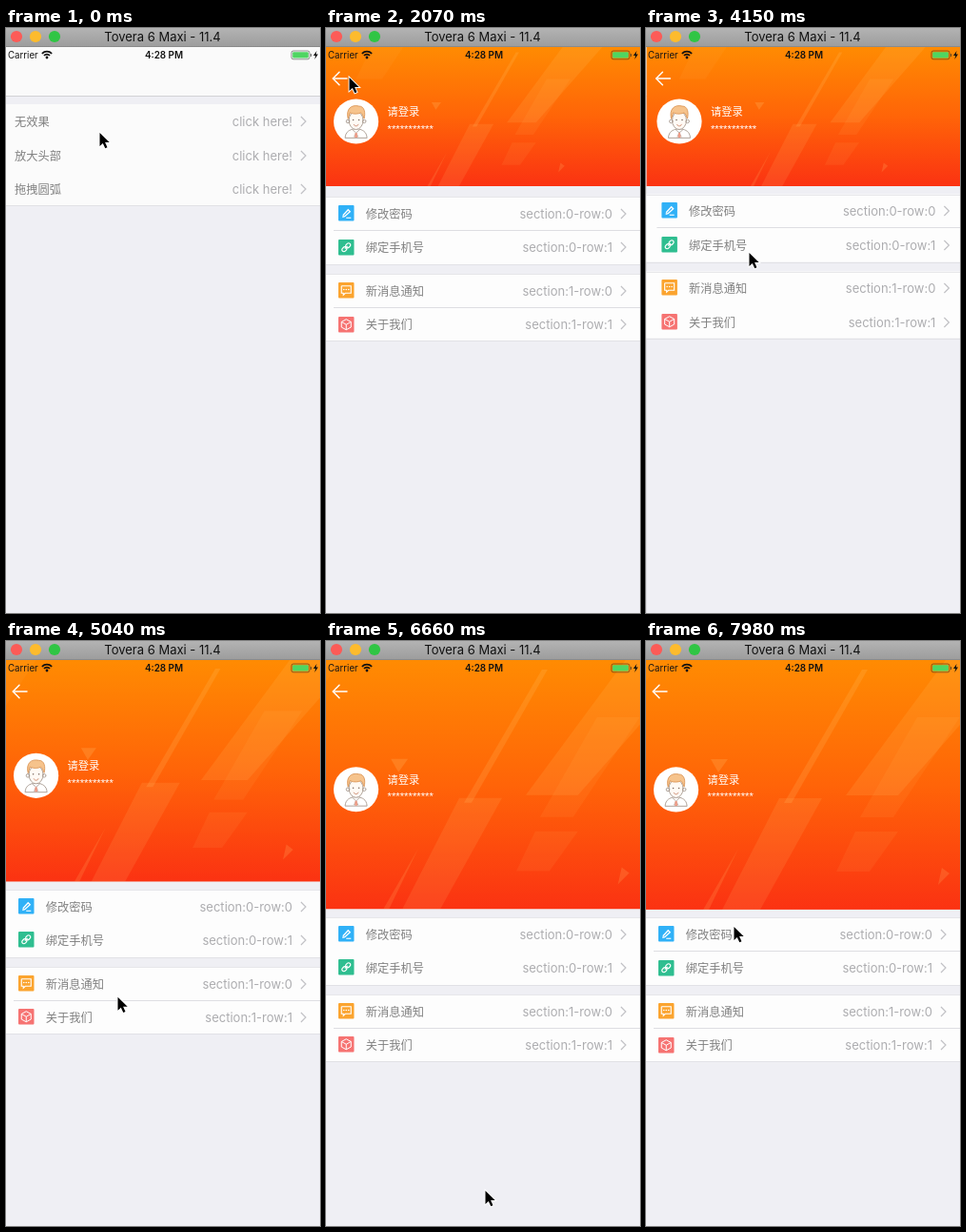
Recreate the animation shown at these times as an HTML page with a canvas. Size 330 px wide and 614 px high, loop 8000 ms.

```html
<!DOCTYPE html>
<html lang="zh">
<head>
<meta charset="utf-8">
<style>
html, body { margin: 0; width: 330px; height: 614px; overflow: hidden; background: #efeff4; }
canvas { display: block; width: 330px; height: 614px; }
</style>
</head>
<body>
<canvas id="stage"></canvas>
<script>
const W = 330, H = 614, LOOP = 8000, TICK = 147.75;
const canvas = document.getElementById('stage');
const c = canvas.getContext('2d');
const dpr = window.devicePixelRatio || 1;
canvas.width = W * dpr;
canvas.height = H * dpr;

const LATIN = 'Inter, Roboto, sans-serif';
const HAN = '"Noto Sans CJK SC", "Noto Sans CJK", sans-serif';
const BG = '#efeff4';

// Keys are in ticks: the screen was sampled at a steady slow rate.
const POINTER = [
  [0, 98, 109], [1, 98, 107], [3, 104, 160], [5, 110, 235], [7, 118, 300], [10, 128, 378],
  [12, 80, 210], [14, 24, 51], [17, 24, 51], [18, 11, 55], [21, 11, 55], [24, 96, 132],
  [25, 96, 132], [26, 98, 140], [28, 108, 235], [30, 108, 235], [31, 108, 180], [35, 120, 437],
  [39, 118, 290], [45, 167, 576], [46, 165, 574], [51, 96, 270], [54, 92, 299]
];
const PULL = [
  [5, 0], [10, 70], [11, 46], [12, 20], [13, 8], [14, 2.85], [16, 0],
  [31, 0], [35, 115.5], [39, 57.7], [42, 100], [45, 115.5], [46, 115.5], [50, 75], [54, 115.88]
];
// Highlights in the banner, measured from its top centre at a height of 262.
const SHINE = [
  [.12, 20, 145, -25, 145, -85, 262, -45, 262],
  [.16, 68, 10, 62, 10, -20, 150, -12, 150],
  [.13, 150, 0, 225, 0, 100, 142, 45, 142],
  [.08, 120, 60, 165, 60, 95, 165, 60, 165],
  [.08, 55, 180, 100, 180, 70, 222, 35, 222],
  [.2, -97, 104, -79, 104, -89, 118],
  [.15, -105, 262, -99, 262, -68, 198],
  [.06, -210, 0, -150, 0, -190, 60, -240, 60],
  [.18, 146, 218, 154, 224, 142, 236]
];
const ROWS = [
  ['修改密码', 'section:0-row:0', 192, '#30b1f7'],
  ['绑定手机号', 'section:0-row:1', 227.5, '#2fbe90'],
  ['新消息通知', 'section:1-row:0', 273, '#fba42f'],
  ['关于我们', 'section:1-row:1', 308.5, '#f67372']
];

function at(keys, t, i = 1) {
  if (t <= keys[0][0]) return keys[0][i];
  for (let k = 1; k < keys.length; k++) {
    const a = keys[k - 1], b = keys[k];
    if (t <= b[0]) return a[i] + (b[i] - a[i]) * (t - a[0]) / (b[0] - a[0]);
  }
  return keys[keys.length - 1][i];
}

// Critically damped spring, 1 falling to 0.
function spring(t) {
  const s = 2.51 * Math.max(0, t);
  return (1 + s) * Math.exp(-s);
}

function pageX(t) {
  const s = t < 19.825 ? spring(t - .6) : t < 25.3 ? 1 - spring(t - 19.825) : spring(t - 25.37);
  return s < .002 ? 0 : s > .998 ? W + 10 : s * W;
}

function rect(x, y, w, h, fill) {
  c.fillStyle = fill;
  c.fillRect(x, y, w, h);
}

function trace(pts, x = 0, y = 0, k = 1) {
  c.beginPath();
  for (let i = 0; i < pts.length; i += 2) c.lineTo(x + pts[i] * k, y + pts[i + 1] * k);
}

function line(pts, color, width, x, y) {
  trace(pts, x, y);
  c.strokeStyle = color;
  c.lineWidth = width;
  c.stroke();
}

function disc(x, y, r, fill) {
  c.beginPath();
  c.arc(x, y, r, 0, 7);
  c.fillStyle = fill;
  c.fill();
}

function text(s, x, y, font, color, align = 'left') {
  c.font = font;
  c.fillStyle = color;
  c.textAlign = align;
  c.textBaseline = 'alphabetic';
  c.fillText(s, x, y);
}

function row(label, detail, x, y) {
  y = Math.round(y);
  text(label, x, y + 5, '12.25px ' + HAN, '#818181');
  text(detail, 301, y + 5, '13px ' + LATIN, '#adadb0', 'right');
  line([310, -5, 315, 0, 310, 5], '#c1c1c5', 1.2, 0, y);
}

function block(top, bottom) {
  rect(0, top, W + 4, bottom - top, '#fdfdfd');
  rect(0, Math.round(top), W + 4, .7, '#dfdfe3');
  rect(0, Math.round(bottom), W + 4, .7, '#dcdce0');
}

function drawMenu(x) {
  const p = Math.max(0, 1 - x / W);
  rect(0, 20, W, H, BG);
  c.save();
  c.translate(-.3 * W * p, 0);
  rect(0, 20, W * 1.3, 51, '#fafafa');
  rect(0, 71, W * 1.3, 1, '#d2d2d5');
  rect(0, 80, W * 1.3, 106, '#fbfbfb');
  rect(0, 186, W * 1.3, .7, '#dcdce0');
  ['无效果', '放大头部', '拖拽圆弧'].forEach((s, i) => row(s, 'click here!', 9, 98 + 35.6 * i));
  c.restore();
  rect(0, 20, W, H, `rgba(0,0,0,${.13 * p})`);
}

function drawFace(x, y) {
  disc(x, y, 23.6, '#fff');
  c.save();
  c.translate(x, y);
  c.lineCap = c.lineJoin = 'round';
  const ink = '#a89a90';
  c.beginPath();
  c.moveTo(-11.5, 17);
  c.bezierCurveTo(-11, 10, -6, 9, -3, 8);
  c.lineTo(3, 8);
  c.bezierCurveTo(6, 9, 11, 10, 11.5, 17);
  c.closePath();
  c.strokeStyle = ink;
  c.lineWidth = .9;
  c.stroke();
  c.beginPath();
  c.ellipse(0, -1, 7.5, 9.5, 0, 0, 7);
  c.fillStyle = '#fffaf5';
  c.fill();
  c.stroke();
  for (const s of [-1, 1]) {
    c.beginPath();
    c.arc(s * 8.6, 0, 1.8, 0, 7);
    c.stroke();
    disc(s * 3, -1.5, .8, '#7d6a60');
    line([s * 4, 8.5, 0, 12, s * 2, 16], ink, .8, 0, 0);
  }
  c.beginPath();
  c.moveTo(-8.5, -3);
  c.bezierCurveTo(-11, -13, -5, -18, 3, -16);
  c.bezierCurveTo(9, -16, 10, -9, 8.5, -3);
  c.bezierCurveTo(7, -6, 7, -8, 5, -9);
  c.bezierCurveTo(0, -7, -4, -8, -6, -9);
  c.closePath();
  c.fillStyle = '#f6c38c';
  c.fill();
  c.strokeStyle = '#d8904f';
  c.stroke();
  c.beginPath();
  c.arc(0, 2.5, 2.5, .3, 2.8);
  c.strokeStyle = '#c98468';
  c.stroke();
  trace([-1, 12, 1, 12, 1.5, 17, -1.5, 17]);
  c.fillStyle = '#ee9b86';
  c.fill();
  c.restore();
}

function drawBanner(h) {
  const g = c.createLinearGradient(0, 20, 0, 20 + h);
  g.addColorStop(0, '#ff8b02');
  g.addColorStop(.5, '#ff6408');
  g.addColorStop(1, '#fb3212');
  c.save();
  c.beginPath();
  c.rect(-3, 20, W + 6, h);
  c.clip();
  rect(-3, 20, W + 6, h, g);
  for (const [a, ...pts] of SHINE) {
    trace(pts, 165, 20, h / 262);
    c.fillStyle = `rgba(255,205,120,${a})`;
    c.fill();
  }
  c.restore();
  const y = (h - 146) / 2;
  drawFace(31.6, 98 + y);
  text('请登录', 64.5, Math.round(92 + y), '11.3px ' + HAN, '#fff');
  text('*'.repeat(11), 64.5, Math.round(109.5 + y), '11.3px "Liberation Sans", sans-serif', '#fff');
  c.lineCap = c.lineJoin = 'round';
  line([22, 53, 7.5, 53], '#fff', 1.5, 0, 0);
  line([14, 46.3, 7.3, 53, 14, 59.7], '#fff', 1.5, 0, 0);
  c.lineCap = 'butt';
}

const GLYPHS = [
  () => {
    line([-3.5, 2.5, 2, -3.5, 4, -1.5, -1.5, 3.5, -4, 4], '#fff', 1.3, 0, 0);
    line([0, 5, 5, 5], '#fff', 1.1, 0, 0);
  },
  () => {
    c.rotate(-Math.PI / 4);
    c.strokeStyle = '#fff';
    c.lineWidth = 1.2;
    for (const x of [-5.5, 0]) {
      c.beginPath();
      c.roundRect(x, -2, 5.5, 4, 2);
      c.stroke();
    }
    line([-2, 0, 2, 0], '#fff', 1.1, 0, 0);
  },
  () => {
    line([-5, -4.5, 5, -4.5, 5, 3, -1, 3, -3, 5, -3, 3, -5, 3, -5, -4.5], '#fff', 1.1, 0, 0);
    for (const x of [-2.5, 0, 2.5]) disc(x, -.7, .8, '#fff');
  },
  () => {
    line([0, -5.5, 5, -2.8, 5, 2.8, 0, 5.5, -5, 2.8, -5, -2.8, 0, -5.5], '#fff', 1, 0, 0);
    line([-5, -2.8, 0, 0, 5, -2.8], '#fff', 1, 0, 0);
    line([0, 0, 0, 5.5], '#fff', 1, 0, 0);
  }
];

function drawPage(x, pull, grows) {
  if (x >= W) return;
  c.save();
  if (x > 0) {
    const g = c.createLinearGradient(x - 9, 0, x - 3, 0);
    g.addColorStop(0, 'rgba(0,0,0,0)');
    g.addColorStop(1, 'rgba(0,0,0,.05)');
    rect(x - 9, 20, 6, H, g);
  }
  c.translate(x, 0);
  rect(-3, 20, W + 6, H, BG);
  c.save();
  c.translate(-3, 0);
  block(174.5 + pull, 245.5 + pull);
  block(255.5 + pull, 325.5 + pull);
  c.restore();
  // Hairlines only survive the downscale at some sub-pixel positions.
  for (const base of [209.2, 290.6]) {
    const y = base + pull;
    if (y % 1 < .5) rect(8, Math.floor(y), W, 1, '#dedee2');
  }
  ROWS.forEach(([label, detail, y, color], i) => {
    row(label, detail, 41.7, y + pull);
    const top = Math.round(y + pull - 8.8);
    c.save();
    c.beginPath();
    c.roundRect(13, top, 16.5, 16.5, 1);
    c.fillStyle = color;
    c.fill();
    c.translate(21.25, top + 8.25);
    GLYPHS[i]();
    c.restore();
  });
  drawBanner(146 + (grows ? pull : 0));
  c.restore();
}

function drawStatus() {
  text('Carrier', 2, 32, '9.7px ' + LATIN, '#151515');
  text('4:28 PM', 166, 32, '600 9.9px ' + LATIN, '#111', 'center');
  c.strokeStyle = '#111';
  c.lineWidth = 1.7;
  for (const r of [4.3, 7.3]) {
    c.beginPath();
    c.arc(43, 32, r, -Math.PI * .75, -Math.PI * .25);
    c.stroke();
  }
  disc(43, 31, 1.4, '#111');
  c.beginPath();
  c.roundRect(300, 24, 19, 8.8, 2);
  c.strokeStyle = 'rgba(40,40,40,.65)';
  c.lineWidth = .8;
  c.stroke();
  c.beginPath();
  c.roundRect(301.2, 25.2, 16.6, 6.4, 1);
  c.fillStyle = '#4fd562';
  c.fill();
  rect(320, 27, 1.1, 3, 'rgba(40,40,40,.65)');
  trace([326.5, 24, 323, 29, 325.3, 29, 324.3, 33, 328, 27.6, 325.8, 27.6]);
  c.fillStyle = '#111';
  c.fill();
}

function drawTitle() {
  const g = c.createLinearGradient(0, 0, 0, 20);
  g.addColorStop(0, '#b3b3b3');
  g.addColorStop(1, '#9c9c9c');
  rect(0, 0, W, 20, g);
  rect(0, 19, W, 1, '#8b8b8b');
  ['#fc5b57', '#fdbb2d', '#30c544'].forEach((color, i) => disc(11 + 20 * i, 9, 6.1, color));
  text('Tovera 6 Maxi - 11.4', 164.5, 14, '13px ' + LATIN, '#111', 'center');
}

function drawPointer(x, y) {
  c.save();
  c.lineJoin = 'miter';
  trace([0, 1, 0, 15, 3.3, 12, 5.8, 17.3, 8, 16.3, 5.6, 11, 10.2, 11], x + .5, y);
  c.closePath();
  c.strokeStyle = '#fff';
  c.lineWidth = 1.8;
  c.stroke();
  c.fillStyle = '#000';
  c.fill();
  c.restore();
}

function draw(ms) {
  const t = Math.floor(ms / TICK);
  const x = pageX(t);
  c.setTransform(dpr, 0, 0, dpr, 0, 0);
  drawMenu(x);
  drawPage(x, at(PULL, t), t > 25);
  drawStatus();
  drawTitle();
  drawPointer(at(POINTER, t), at(POINTER, t, 2));
}

const start = performance.now();
function loop() {
  draw((performance.now() - start) % LOOP);
  requestAnimationFrame(loop);
}
draw(0);
requestAnimationFrame(loop);
</script>
</body>
</html>
```
